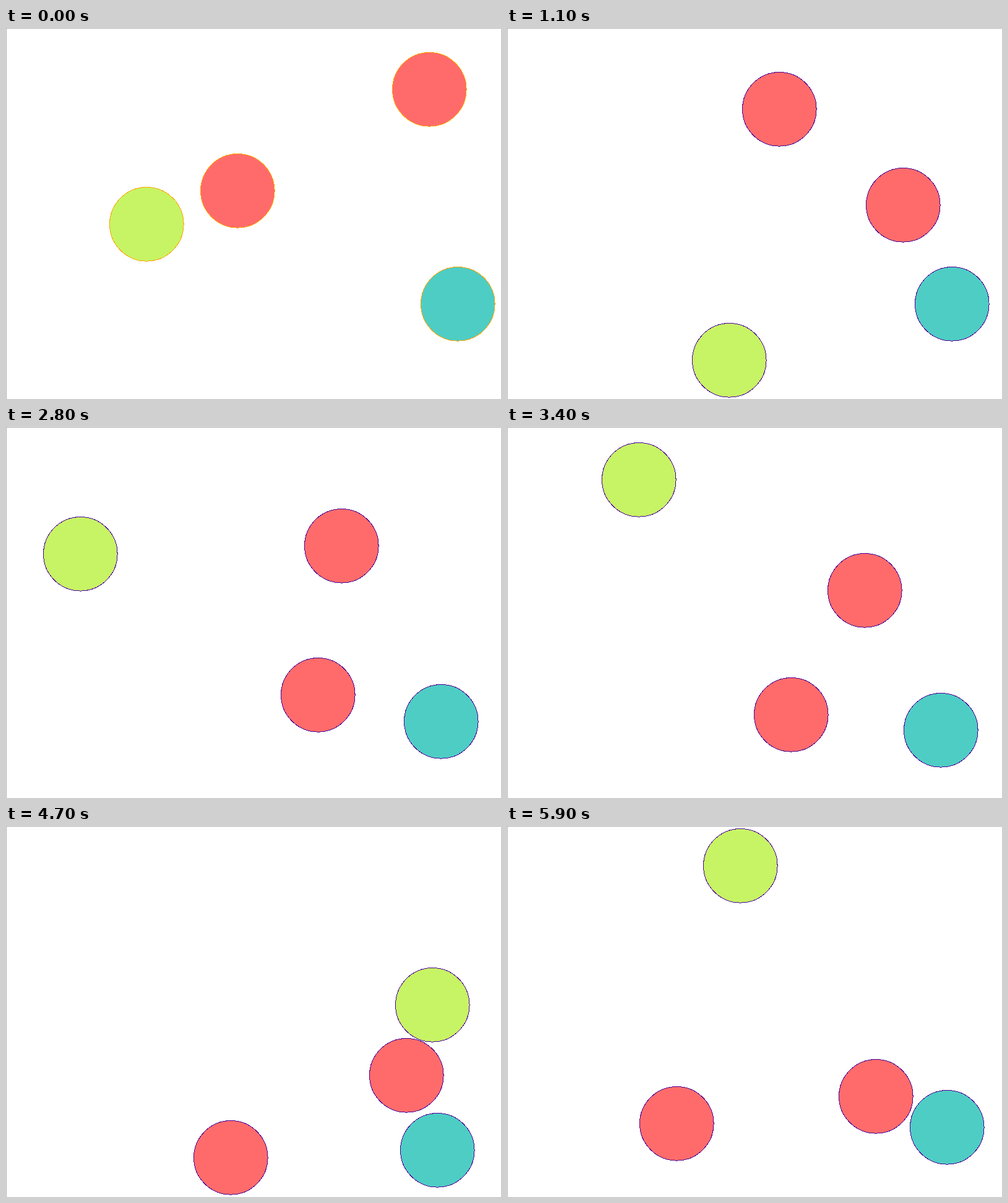
Recreate the animation shown at these times as an HTML page. Size 800 by 600 pixels, loop 6 s.

```html
<!DOCTYPE html>
<html lang="en">
<head>
<meta charset="utf-8">
<title>Bouncing balls</title>
<style>
  html, body { margin: 0; width: 100%; height: 100%; overflow: hidden; background: #fff; }
  svg { display: block; width: 800px; height: 600px; shape-rendering: crispEdges; }
</style>
</head>
<body>
<svg viewBox="0 0 800 600">
  <rect width="800" height="600" fill="#fff"/>
  <g id="balls"></g>
  <path d="M0 0H800V1H1V600H0Z" fill="#b4b4b4"/>
</svg>
<script>
const TICK = 100, TICKS = 60, SUBSTEPS = 5;
const CONTACT = 121; // ball diameter with its outline
const MIN = 60, MAX_X = 741.3, MAX_Y = 540.9; // limits for ball centres
const START_LINE = '#ffa500', LINE = '#4b0096';

// Speeds are in pixels per tick
const balls = [
  { fill: '#ff6b6b', mass: 5, x: 374, y: 263, vx: 6, vy: -12 },
  { fill: '#4ecdc4', mass: 25, x: 730, y: 446, vx: 3, vy: 0 },
  { fill: '#ff6b6b', mass: 5, x: 684, y: 99.2, vx: -4, vy: 17 },
  { fill: '#c7f464', mass: 1, x: 227, y: 317, vx: 12, vy: 20 }
];

function moveAxis(ball, pos, vel, max) {
  ball[pos] += ball[vel] / SUBSTEPS;
  if (ball[pos] < MIN || ball[pos] > max) {
    ball[pos] = Math.min(max, Math.max(MIN, ball[pos]));
    ball[vel] *= -1;
  }
}

// Elastic collision; overlapping balls are pushed apart equally
function collide(a, b) {
  const dx = b.x - a.x, dy = b.y - a.y, dist = Math.hypot(dx, dy);
  if (dist >= CONTACT) return;
  const nx = dx / dist, ny = dy / dist;
  const push = (CONTACT - dist) / 2;
  a.x -= nx * push; a.y -= ny * push;
  b.x += nx * push; b.y += ny * push;

  const closing = (a.vx - b.vx) * nx + (a.vy - b.vy) * ny;
  if (closing <= 0) return;
  const impulse = 2 * closing * a.mass * b.mass / (a.mass + b.mass);
  a.vx -= impulse / a.mass * nx; a.vy -= impulse / a.mass * ny;
  b.vx += impulse / b.mass * nx; b.vy += impulse / b.mass * ny;
}

function step() {
  for (let i = 0; i < SUBSTEPS; i++) {
    for (const ball of balls) {
      moveAxis(ball, 'x', 'vx', MAX_X);
      moveAxis(ball, 'y', 'vy', MAX_Y);
    }
  }
  balls.forEach((a, i) => balls.slice(i + 1).forEach(b => collide(a, b)));
}

const group = document.getElementById('balls');
const nodes = balls.map(({ fill }) => {
  const node = document.createElementNS('http://www.w3.org/2000/svg', 'circle');
  node.setAttribute('r', 59.8);
  node.setAttribute('fill', fill);
  group.append(node);
  return node;
});

// Run the whole loop once, so drawing depends on the time alone
const poses = Array.from({ length: TICKS }, (_, tick) => {
  if (tick) step();
  return balls.map(({ x, y }) => [x, y]);
});

// Whole pixels keep the thin outline sharp
const snap = v => Math.floor(v + 0.1) + 0.3;

function draw(tick) {
  group.setAttribute('stroke', tick ? LINE : START_LINE);
  poses[tick].forEach(([x, y], i) => {
    nodes[i].setAttribute('cx', snap(x));
    nodes[i].setAttribute('cy', snap(y));
  });
}

const start = performance.now();
function loop() {
  draw(Math.floor((performance.now() - start) / TICK) % TICKS);
  requestAnimationFrame(loop);
}
draw(0);
requestAnimationFrame(loop);
</script>
</body>
</html>
```
